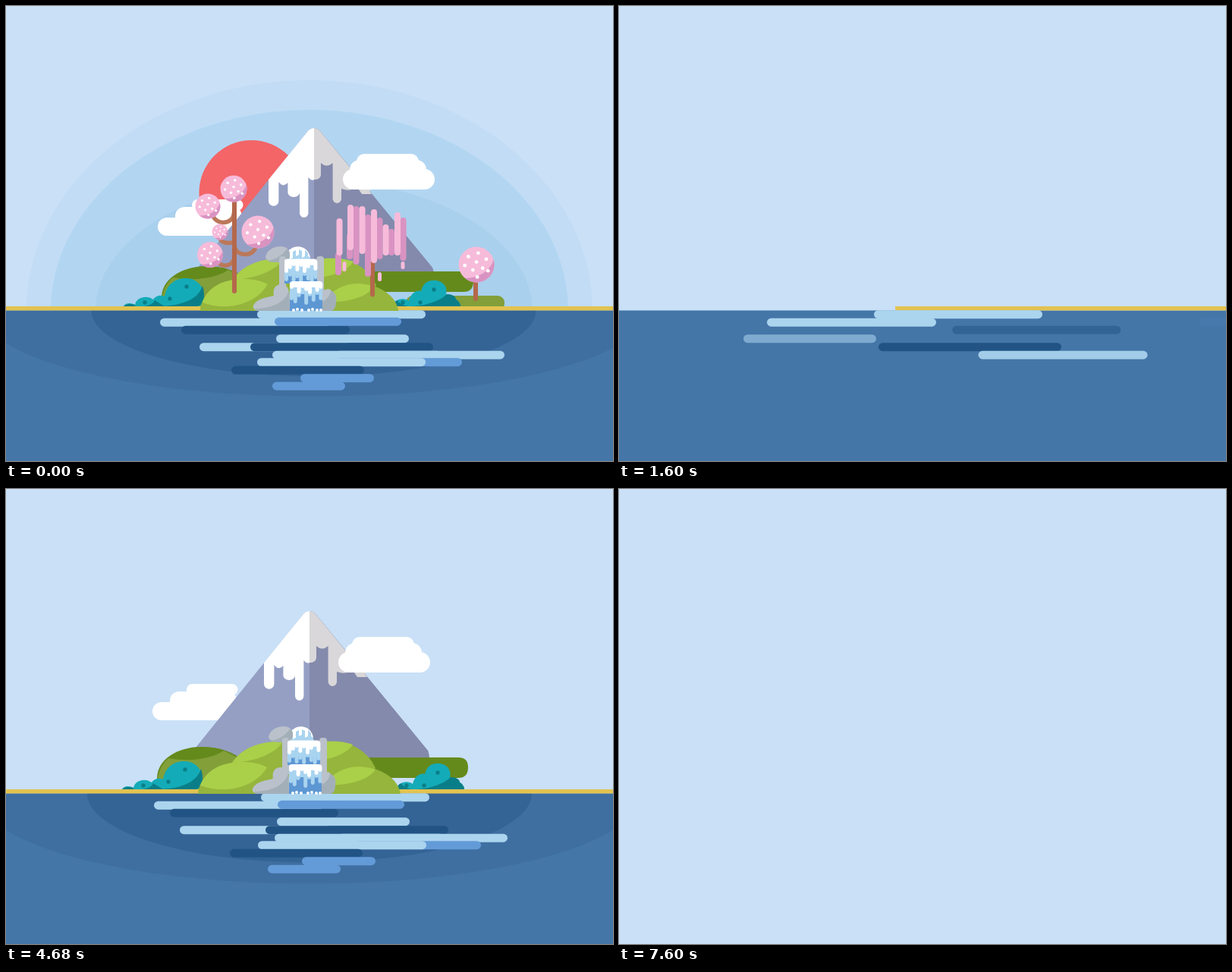
Animation of 800 by 600 pixels, one loop 8000 ms. Source, as an HTML page:

```html
<!DOCTYPE html>
<html lang="en">
<head>
<meta charset="utf-8">
<title>Island</title>
<style>
html, body { margin: 0; width: 100%; height: 100%; overflow: hidden; background: #c9e0f7 }
svg { display: block; width: 800px; height: 600px }
</style>
</head>
<body>
<svg id="stage" viewBox="0 0 800 600"></svg>
<script>
const SKY = '#c9e0f7', LOOP = 8000, STEP = 40, SEA = 401.5;
const FADE = 560, BUILD = 1360, CLEAR = 7600;
const LEAF = '#aacf49', LEAF_DARK = '#95b53c', OLIVE = '#658a1c', OLIVE_LIGHT = '#829f39';
const TEAL = '#14abb8', TEAL_DARK = '#0a7e88', ROCK = '#bac1ca', ROCK_DARK = '#a3afb8';
const PINK = '#f7bbda', PINK_DARK = '#d993c2', BARK = '#b4684b';
const FOAM = '#a9d4f0', STREAM = '#5d97d3';

// Shapes
const path = (fill, d) => `<path fill="${fill}" d="${d}"/>`;
const rect = (fill, x, y, w, h, r = 0) =>
  `<rect fill="${fill}" x="${x}" y="${y}" width="${w}" height="${h}" rx="${r}"/>`;
const ellipse = (fill, x, y, rx, ry = rx) =>
  `<ellipse fill="${fill}" cx="${x}" cy="${y}" rx="${rx}" ry="${ry}"/>`;
const line = (d, w = 6, color = BARK) =>
  `<path fill="none" stroke="${color}" stroke-width="${w}" stroke-linecap="round" d="${d}"/>`;
const dots = (color, r, points) => points.map(([x, y]) => ellipse(color, x, y, r)).join('');
const drips = (fill, x, y, w, lengths) =>
  lengths.map((h, i) => rect(fill, x + i * w, y, w + .2, h, w / 2)).join('');

function blossom(x, y, r) {
  const spots = [[-.45, -.45], [.1, -.65], [.55, -.3], [0, -.15], [-.65, .05], [-.2, .3], [.35, .2], [.05, .7], [.65, .35]];
  return `<g transform="translate(${x} ${y}) scale(${r})">${ellipse(PINK, 0, 0, 1)}` +
    path(PINK_DARK, 'M-.65 .76C.1 .75 .75 .4 .96 -.28A1 1 0 0 1 -.65 .76Z') +
    dots('#fff', .1, spots) + '</g>';
}

// Easing
const clamp = v => Math.max(0, Math.min(1, v));
const easeOut = p => 1 - (1 - p) ** 3;
const backOut = p => 1 + 2.70158 * (p - 1) ** 3 + 1.70158 * (p - 1) ** 2;

// Each part enters from the pose `from`; `rest` is its pose while the finished picture is held.
const parts = [];
const add = (art, start, dur, motion = {}) => parts.push({ art, start, dur, ...motion });

// Halos
add(ellipse('#c2dcf5', 400, 402, 373, 304) + ellipse('#b2d6f2', 400, 402, 341, 265) +
  ellipse('#a9d0ed', 406, 402, 288, 172), 6360, 280,
  { pivot: [400, 402], from: { sx: .85, sy: .85 }, to: { sx: 1.036, sy: 1.036 } });

// Sun, clouds and mountain
add(ellipse('#f36567', 314, 236, 69), 4640, 840,
  { from: { y: 180 }, rest: { x: 9.5, y: 10 }, ease: backOut });
add(rect('#fff', 193, 281, 120, 24, 12) + rect('#fff', 216, 267, 88, 30, 12) +
  rect('#fff', 238, 257, 67.5, 15, 7.5), 4160, 480, { from: { x: -230 }, rest: { x: 7, y: -2 } });
add(path('#959fc4', 'M391 166Q400 156 409 166L556 345Q562 362 548 362H253Q239 362 246 346Z') +
  path('#848aac', 'M400 161Q405 161 409 166L556 345Q562 362 548 362H400Z') +
  path('#fff', 'M400 161Q395 161 391 166L340 229V257a6.7 6.7 0 0 0 13.4 0V232q6 8 12 1V246a7.8 6 0 0 0 15.6 0V273a5.7 6 0 0 0 11.4 0V226q4 5 7.6 3Z') +
  path('#d9d7d9', 'M400 161Q405 161 409 166L476 248H463L455 236Q452 246 436 241V254a5.7 6 0 0 1 -11.4 0V207q-8 7 -15.6 0V223q-1 6 -9 6Z') +
  ellipse('#d9d7d9', 469.5, 241, 6, 4),
  3840, 800, { pivot: [400, 362], from: { sy: 0 }, rest: { x: 6 } });
add(rect('#fff', 456, 195, 82, 30, 10) + rect('#fff', 447, 203, 101, 34, 13) +
  rect('#fff', 438, 215, 121, 27, 13.5), 4200, 440, { from: { x: 260 }, rest: { x: 6 } });

// Far hills
add(path(OLIVE, 'M199 396V382C199 354 230 340 258 340C282 340 300 347 312 358V396Z') +
  path(OLIVE_LIGHT, 'M199 390C200 372 206 362 214 355C245 361 275 354 287 345L312 358V396H199Z'),
  3960, 680, { from: { x: 67, y: 20 }, rest: { x: 6, y: 3 } });
add(rect(OLIVE_LIGHT, 540, 380, 130, 20, 9), 4720, 720, { from: { x: 135 }, rest: { x: -13, y: 2 } });
add(path(OLIVE, 'M440 354H596Q609 354 609 367Q609 381 596 381H440Z'),
  3960, 680, { from: { x: -145 }, rest: { x: 7, y: -4 } });

// Water
add(rect('#4476a8', 0, SEA, 800, 200), 1370, 200, { from: { y: 198 }, opaque: true });
add(ellipse('#3f6fa1', 400, SEA, 438, 119) + ellipse('#346395', 400, SEA, 293, 91), 1680, 520,
  { pivot: [400, SEA], from: { sx: .7, sy: .7 }, rest: { x: 5.5, sy: .952 }, clip: true });
add(rect('#e2c351', 0, 396, 800, SEA - 396), 1420, 780, { from: { x: 800 }, opaque: true });

const LIGHT = '#abd4ee', MID = '#639bd8', DARK = '#215485';
// color, x, y, width, rest x, start, side it comes from
[
  [LIGHT, 336, 407, 222, 331, 1360, -1],
  [LIGHT, 195, 417.5, 223, 203, 1360, -1],
  [DARK, 216, 427.5, 222, 231, 1550, 1],
  [MID, 358, 416.5, 167, 354, 1592, 1],
  [LIGHT, 357, 439, 175, 356, 1541, -1],
  [LIGHT, 229, 450, 200, 255, 1640, -1],
  [DARK, 342, 450, 241, 322, 1360, 1],
  [LIGHT, 438, 460.5, 223, 434, 1463, 1],
  [LIGHT, 354, 460.5, 223, 351, 1680, -1],
  [MID, 459, 470, 167, 434, 1720, 1],
  [LIGHT, 332, 470, 222, 331, 1760, -1],
  [DARK, 295, 480.5, 175, 297, 1820, 1],
  [MID, 390, 491, 97, 388, 1880, 1],
  [MID, 345, 501.5, 96, 351, 1940, -1],
].forEach(([color, x, y, w, restX, start, side]) =>
  add(rect(color, x, y - 5.8, w, 11, 5.5), start, 240, { from: { x: side * 450 }, rest: { x: restX - x } }));

// Bushes
add(path(TEAL, 'M153 396C155 391 163 391 168 394C170 383 185 381 192 387C196 381 203 381 207 383C210 366 222 359 235 359C250 359 259 370 259 384Q258 396 250 396Z') +
  path(TEAL_DARK, 'M257 369C262 385 257 396 249 396H205C235 394 252 385 257 369ZM153 396Q158 391 168 394V396ZM180 396Q192 394 194 388L207 396Z') +
  dots(TEAL_DARK, 2.7, [[236, 370], [214, 386], [181, 391]]), 3200, 480, { from: { x: -30, y: 8 }, rest: { x: 2 } });
add(path(TEAL, 'M515 396C517 386 530 384 536 389C538 380 545 374 552 376C555 364 563 361 572 362C584 364 587 373 585 381C593 380 598 383 598 387C602 389 604 393 604 396Z') +
  path(TEAL_DARK, 'M604 396H535C560 396 578 388 586 380C593 380 598 383 598 387C602 389 604 393 604 396ZM515 396Q516 389 521 388Q524 394 535 396Z') +
  dots(TEAL_DARK, 2.7, [[569, 374], [551, 391], [528, 391]]), 3200, 480, { from: { x: 42, y: 8 }, rest: { x: -5 } });

// Upper hills and falls
add(path(LEAF_DARK, 'M298 361C310 342 335 333 364 333L375 345V390H320ZM418 390V333C450 331 475 342 487 368L470 390Z') +
  path(LEAF, 'M298 361C325 360 355 350 365 333C335 332 310 342 298 361ZM418 333C435 332 447 333 457 337C450 348 435 354 418 357Z'),
  2920, 600, { pivot: [390, 402], from: { sy: .3 }, rest: { x: 1 } });
add(path(FOAM, 'M371 334C373 308 403 308 406 334Z') +
  path('#fff', 'M371 331C374 308 402 308 405 328L402 326V322L398 318V326L394 328V319L390 317V324L386 326V318L382 320V328L378 330V322Z') +
  path(ROCK, 'M346 327C348 317 358 313 366 313C375 313 379 319 378 326C375 334 368 334 362 333C355 333 347 333 346 327Z') +
  path(ROCK_DARK, 'M349 332C360 330 370 324 374 316Q379 319 378 327Q374 336 362 334Q352 334 349 332Z'),
  3120, 480, { from: { y: 24 }, rest: { x: -4, y: 4 } });
add(rect(ROCK, 364, 328, 9, 50, 4) + rect(ROCK, 413, 328, 10, 50, 4) +
  rect(STREAM, 371, 336, 43, 28) + rect(FOAM, 371, 336, 43, 17) +
  drips(FOAM, 371, 340, 4.8, [21, 15, 22, 17, 23, 14, 20, 23, 18]) +
  rect('#fff', 371, 331.5, 43, 8, 4) + drips('#fff', 371, 333, 4.8, [17, 12, 8, 15, 9, 17, 11, 7, 14]),
  2960, 480, { pivot: [392, 402], from: { y: 30 }, rest: { x: -4, y: 2 } });

// Front hills and falls
add(path(LEAF_DARK, 'M253 402C256 374 284 360 312 360C340 360 362 378 372 402ZM410 402C415 380 435 366 464 366C490 366 516 379 520 402Z') +
  path(LEAF, 'M256 391C290 404 330 392 344 367C335 362 324 360 312 360C284 360 264 370 256 391ZM420 390C450 392 478 384 487 370C479 367 472 366 464 366C448 366 430 374 420 390Z'),
  2220, 440, { pivot: [387, 402], from: { sx: 1.24, sy: 0 }, rest: { sx: .98 }, opaque: true });
add(rect(STREAM, 373, 364, 43, 38) + rect(FOAM, 373, 366, 43, 14) +
  drips(FOAM, 373, 370, 4.8, [18, 22, 14, 10, 24, 13, 20, 11, 18]) +
  rect('#fff', 373, 363, 43, 8, 3.5) + drips('#fff', 373, 364, 4.8, [9, 7, 15, 8, 12, 16, 7, 13, 9]) +
  dots('#fff', 2, [[378, 401], [383, 400], [389, 401], [398, 401], [403, 400], [409, 401], [414, 401]]) +
  path(ROCK, 'M325 395C330 385 345 384 352 382C350 372 355 367 362 367C370 367 373 375 373 385V402H333C326 402 324 398 325 395Z') +
  path(ROCK_DARK, 'M327 399C350 399 368 390 372 375L373 402H333Q328 402 327 399Z') +
  path(ROCK_DARK, 'M416 402V376C425 370 437 378 434 390C434 396 432 402 427 402Z') +
  path(ROCK, 'M416 390V376Q421 372 427 374Q427 384 416 390Z'),
  2320, 360, { pivot: [392, 402], from: { sy: 0 }, rest: { x: 1 } });

// Trunks
add(line('M269.5 270C269 289 298 289 298 271M279 305Q282 313 296 311M276 333C278 344 294 344 298 333M327 315C325 330 302 330 299 317', 5.5, '#bb785a') +
  line('M298.5 252V375'), 4760, 680, { pivot: [298, 378], from: { sy: 0 }, rest: { x: 2.5, y: 1 } });
add(line('M491 327V381'), 4960, 480, { pivot: [491, 384], from: { sy: 0 }, rest: { x: -8, y: -.5 } });
add(line('M632 357V386', 6), 5560, 400, { pivot: [632, 388], from: { sy: 0 }, rest: { x: -13 } });

// Hanging blossoms: x, top, bottom, color
[
  [446, 325, 355, PINK_DARK], [454, 337, 350, PINK], [461, 300, 334, PINK_DARK], [469.5, 264, 341, PINK_DARK],
  [485, 275, 357, PINK_DARK], [500.5, 351, 363, PINK], [500.5, 279, 334, PINK_DARK], [516, 294, 329, PINK_DARK],
  [531.5, 279, 336, PINK_DARK], [531, 337, 347, PINK],
  [447.5, 280, 329, PINK], [462, 262, 322, PINK], [477.5, 264, 327, PINK], [493, 268, 339, PINK],
  [508.5, 288, 329, PINK], [524, 272, 329, PINK],
].forEach(([x, top, bottom, color], i) => {
  const w = bottom - top < 20 ? 5 : 8;
  add(rect(color, x - w / 2, top, w, bottom - top, w / 2), 5520 + i * 24, 400,
    { pivot: [x, top], from: { sy: 0 }, rest: { x: -8 } });
});

// Round blossoms: x, y, radius, rest x offset, rest y offset
[
  [297, 237, 17.5, 3, 4], [263, 262, 16.5, 3, 2], [278, 296, 10.5, 4, 2], [266, 325, 17, 3, 3],
  [328, 295, 21.5, 4, 3], [633, 339, 23.5, -13, 2],
].forEach(([x, y, r, restX, restY], i) =>
  add(blossom(x, y, r), 5500 + i * 70, 460,
    { pivot: [x, y], from: { sx: 0, sy: 0 }, rest: { x: restX, y: restY }, ease: backOut }));

const stage = document.getElementById('stage');
stage.innerHTML = `<clipPath id="sea"><path d="M0 ${SEA}H800V600H0Z"/></clipPath>` + rect(SKY, 0, 0, 800, 600) +
  parts.map(p => `<g${p.clip ? ' clip-path="url(#sea)"' : ''}><g class="part">${p.art}</g></g>`).join('') +
  `<g id="veil">${rect(SKY, 0, 0, 800, 600)}</g>`;
const groups = stage.querySelectorAll('.part');
const veil = document.getElementById('veil');
const HOME = { x: 0, y: 0, sx: 1, sy: 1 };

function render(t) {
  const holding = t < BUILD;
  parts.forEach((part, i) => {
    const p = holding ? 1 : clamp((t - part.start) / part.dur);
    const e = p && (part.ease || easeOut)(p);
    const from = { ...HOME, ...part.from };
    const end = { ...HOME, ...(holding ? part.rest : part.to) };
    const mix = key => from[key] + (end[key] - from[key]) * e;
    const [cx, cy] = part.pivot || [0, 0];
    groups[i].setAttribute('transform',
      `translate(${mix('x') + cx} ${mix('y') + cy}) scale(${mix('sx')} ${mix('sy')}) translate(${-cx} ${-cy})`);
    groups[i].setAttribute('opacity', p === 0 ? 0 : part.opaque ? 1 : clamp(e));
  });
  const fade = holding ? 1 - (1 - clamp((t - FADE) / (BUILD - FADE))) ** 2.65 : 0;
  veil.setAttribute('opacity', t >= CLEAR ? 1 : fade);
}

const begin = performance.now();
function tick() {
  const t = (performance.now() - begin) % LOOP;
  render(Math.floor(t / STEP) * STEP);
  requestAnimationFrame(tick);
}
tick();
</script>
</body>
</html>
```
